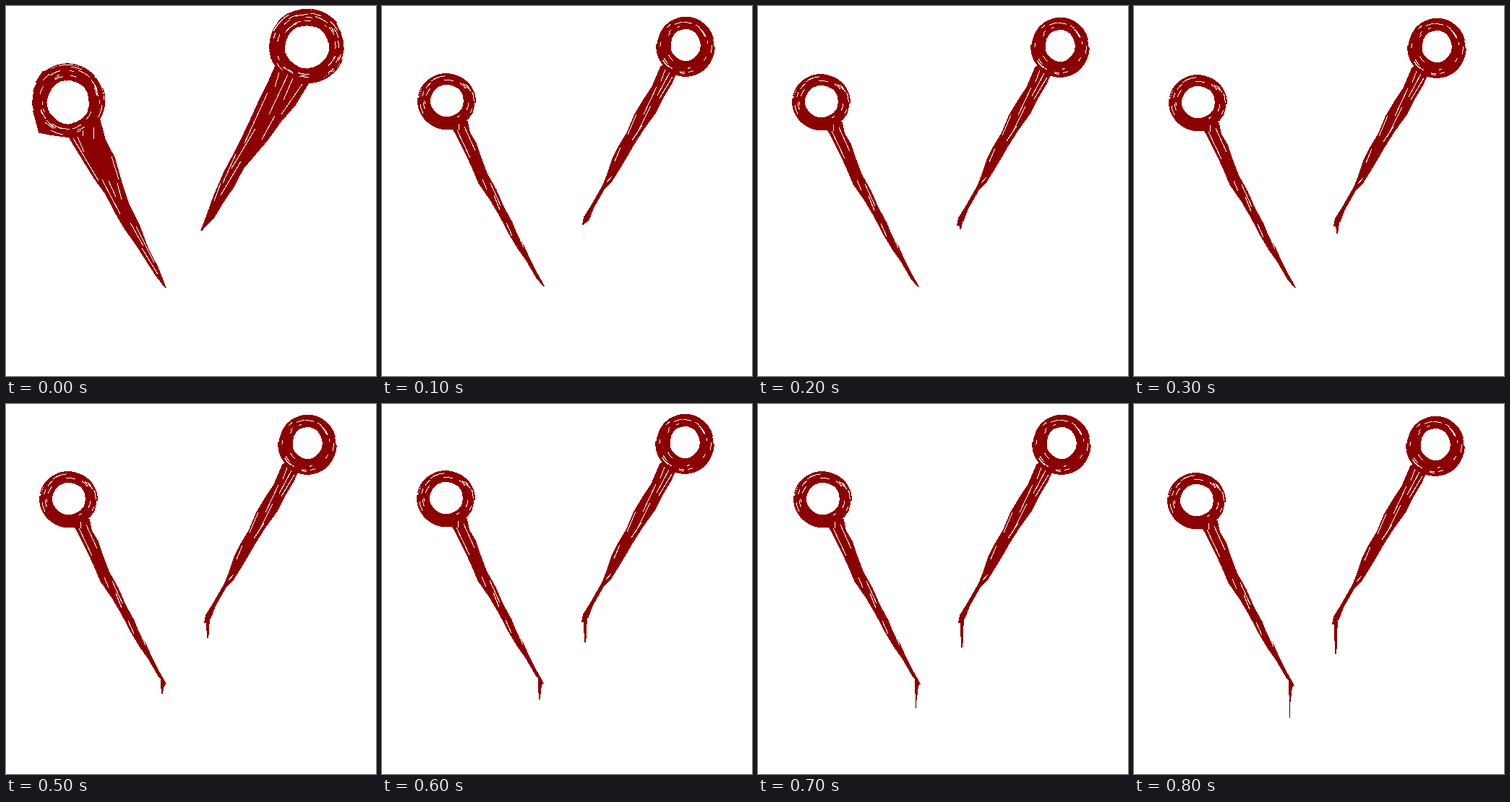
Animation of 512 by 512 pixels, one loop 900 ms. Source, as an HTML page:

```html
<!DOCTYPE html>
<html lang="en">
<head>
<meta charset="utf-8">
<title>Two pins</title>
<style>
html, body { margin: 0; width: 100%; height: 100%; overflow: hidden; background: #fff; }
svg { display: block; width: 100%; height: 100%; shape-rendering: crispEdges; }
.ink { fill: #8b0000; fill-rule: evenodd; }
.edge { stroke: #8b0000; stroke-width: 1.6; }
.strand { fill: none; stroke: #8b0000; stroke-width: 1.5; }
.gap { fill: none; stroke: #fff; }
</style>
</head>
<body>
<svg viewBox="0 0 512 512">
  <g id="thick"></g>
  <g id="thin">
    <g id="pins"></g>
    <path id="drips" class="ink edge"/>
    <path id="thread" stroke="#300"/>
  </g>
</svg>
<script>
const STEP = 100, STEPS = 9;
const $ = id => document.getElementById(id);

function random(seed) {
  return () => (seed = (seed * 16807) % 2147483647) / 2147483647;
}

function polar(cx, cy, rx, ry, a) {
  return `${(cx + rx * Math.cos(a)).toFixed(1)} ${(cy + ry * Math.sin(a)).toFixed(1)}`;
}

function arc(cx, cy, rx, ry, a, span) {
  return `M${polar(cx, cy, rx, ry, a)}A${rx} ${ry} 0 0 1 ${polar(cx, cy, rx, ry, a + span)}`;
}

// Closed, slightly uneven ellipse
function blob(cx, cy, rx, ry, wobble, rnd) {
  const p = rnd() * 6, points = [];
  for (let i = 0; i < 72; i++) {
    const a = i * Math.PI / 36;
    const d = wobble * (0.5 * Math.sin(5 * a + p) + rnd() - 0.5);
    points.push(polar(cx, cy, rx + d, ry + d, a));
  }
  return `M${points.join('L')}Z`;
}

// Loose pen strokes along the rim of a ring
function rimStrands([cx, cy, rx, ry], wobble, rnd) {
  let d = '';
  for (let i = 0; i < 8; i++) {
    const shift = () => (rnd() - 0.5) * 2 * wobble;
    d += arc(cx + shift(), cy + shift(), rx, ry, rnd() * 6.28, 1 + rnd());
  }
  return d;
}

// Concentric gaps left between the pen strokes of a ring
function ringGaps({ outer, inner, count }, rnd) {
  let d = '';
  for (let i = 0; i < count; i++) {
    const k = 0.25 + 0.7 * rnd();
    const ellipse = outer.map((value, j) => inner[j] + (value - inner[j]) * k);
    d += arc(...ellipse, rnd() * 6.28, 0.1 + 0.3 * rnd());
  }
  return d;
}

function pin(shape, seed) {
  const rnd = random(seed);
  const { outer, inner, shaft, gaps, wobble } = shape;
  return `<path class="ink edge" d="${shaft}"/>
    <path class="ink" d="${blob(...outer, wobble, rnd)}${blob(...inner, wobble * 0.6, rnd)}"/>
    <path class="strand" d="${rimStrands(outer, wobble, rnd)}"/>
    <path class="gap" d="${ringGaps(shape, rnd)}${gaps}"/>`;
}

const thickPins = [{
  outer: [86, 131, 49.5, 49.5], inner: [86, 133, 29, 30], count: 34, wobble: 1.4,
  shaft: 'M87 181L106 168L130 158L137 185L150 210L160 245L170 275L185 305L196 335L210 362L221 390L207 372L180 330L165 309L152 287L138 260L122 238L106 212ZM38 146L46 175L62 178L84 181L60 160ZM42 105L51 91L75 86L60 100Z',
  gaps: 'M93 183L128 242M99 181L108 202M133 240L158 288M142 242L152 264M154 245L160 268M107 172L106 180M121 168V184M146 208L156 240M172 300L190 332M180 305L205 355M188 335L210 371'
}, {
  outer: [416, 55, 51.5, 50.5], inner: [416.5, 56.5, 30.5, 29.5], count: 40, wobble: 1.4,
  shaft: 'M373 83L395 92L420 104L400 137L380 160L362 185L345 205L328 225L315 250L300 272L288 292L270 311L278 290L288 262L302 230L318 200L335 165L350 132L362 108Z',
  gaps: 'M378 92L372 112M390 95L364 150M397 100L384 130M410 108L381 150M362 120L330 190M372 152L354 185M345 170L312 225M325 215L297 262M318 205L300 245M297 245L288 270'
}];

const thinPins = [{
  outer: [89.5, 132, 39, 38], inner: [90, 131, 23, 22], count: 20, wobble: 0.8,
  shaft: 'M98 169L104 158L118 160L121 175L130 190L136 208L145 232L158 255L168 278L180 300L186 315L196 332L204 350L212 366L220 380L224 388L214 376L200 352L188 335L176 315L163 290L150 268L134 245L127 228L118 208L108 188Z',
  gaps: 'M104 172L122 210M114 167L129 200M106 163V172M139 240L145 254M150 245L164 276M155 262L163 282M172 300L180 318M186 310L196 334'
}, {
  outer: [420, 56, 39.5, 40.5], inner: [420, 54, 20.5, 22], count: 24, wobble: 0.8,
  shaft: 'M386 84L392 80L408 91L400 108L388 128L378 148L362 170L348 192L340 206L328 226L318 242L308 252L300 266L292 280L286 296L278 302L280 292L289 278L297 264L306 248L311 236L319 212L328 194L340 174L350 150L362 130L374 112Z',
  gaps: 'M392 88L386 104M398 92L381 124M402 98L384 128M380 112L362 150M372 138L352 178M360 165L346 186M352 150L340 178M330 196L322 215M318 236L311 244'
}];

$('thick').innerHTML = pin(thickPins[0], 71) + pin(thickPins[1], 905);
$('pins').innerHTML = pin(thinPins[0], 338) + pin(thinPins[1], 127);

const shake = [[0, 0], [0, 0], [-2, 1], [-1, 2], [-2, 1], [-3, 0], [-1, -1], [0, 0], [-3, 2]];

function leftDrip(step) {
  if (step < 4) return '';
  const tip = step < 6 ? 375 + step * 5 : 409;
  return `M217 376L223 387L221 391L219 ${tip}L218.5 ${tip}L218 385Z`;
}

function rightDrip(step) {
  if (step < 2) return '';
  const tip = step < 5 ? 297 + step * 5 : 289 + step * 6.8;
  const top = Math.min(303, tip - 2);
  return `M286 290L279 302L281 ${top}L281.5 ${tip - 4}L282 ${tip}L282.5 ${tip}L284 300Z`;
}

function draw(now) {
  const step = Math.floor(now / STEP) % STEPS;
  $('thick').style.display = step ? 'none' : '';
  $('thin').style.display = step ? '' : 'none';
  $('thin').setAttribute('transform', `translate(${shake[step]})`);
  $('drips').setAttribute('d', leftDrip(step) + rightDrip(step));
  $('thread').setAttribute('d', step > 6 ? `M218.5 408V${432 - (8 - step) * 11}` : '');
}

function loop() {
  draw(performance.now());
  requestAnimationFrame(loop);
}
loop();
</script>
</body>
</html>
```
